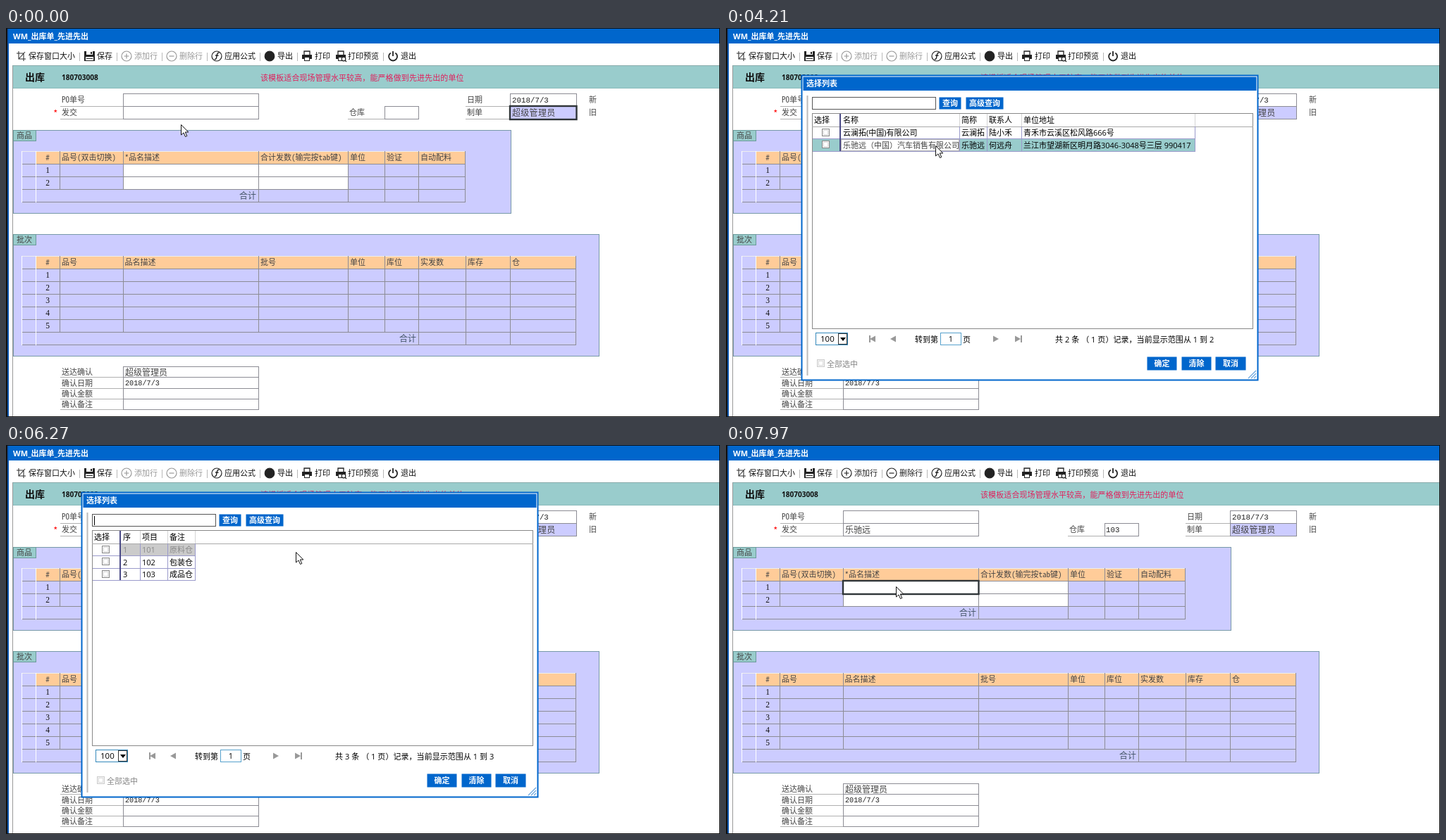
An HTML page for the animation above (8000 ms loop, 1013 by 553 pixels).

```html
<!DOCTYPE html>
<html lang="zh-CN">
<head>
<meta charset="utf-8">
<title>出库单</title>
<style>
html, body { margin: 0; width: 100%; height: 100%; overflow: hidden; background: #fff; }
svg { display: block; width: 1013px; height: 553px; }
text { font: 11px "Open Sans", "Noto Sans CJK SC", "Noto Sans CJK", sans-serif; white-space: pre; }
text.form { font-family: "Noto Sans Mono CJK SC", "Noto Sans CJK SC", "Noto Sans CJK", monospace; }
text.num { font-family: "Liberation Mono", monospace; }
text.serif { font-family: "Liberation Serif", serif; }
text.bold { font-weight: 700; }
.timed { animation: 8s step-end infinite; }
</style>
</head>
<body>
<svg id="stage" viewBox="0 0 1013 553" xmlns="http://www.w3.org/2000/svg"></svg>
<script>
const LOOP = 8000;
const BLUE = '#0066cc', TEAL = '#99cccc', LILAC = '#ccccff', PEACH = '#ffcc99';
const INK = '#444', LINE = '#8c8c94', MUTED = '#8a8a8a';
const css = [];

// Drawing helpers; text is placed by its left edge and vertical middle.
const text = (x, mid, s, { cls = '', size = 11, fill = '#000', anchor = 'start', gap = 0 } = {}) =>
  `<text class="${cls}" x="${x}" y="${(mid + size * 0.38).toFixed(1)}" fill="${fill}" text-anchor="${anchor}"` +
  ` style="font-size:${size}px;letter-spacing:${gap}px">${s}</text>`;
const form = (x, mid, s, o = {}) => text(x, mid, s, { cls: 'form', fill: INK, ...o });
const num = (x, mid, s, o = {}) => text(x, mid, s, { cls: 'num', size: 10.8, fill: '#222', ...o });
const bold = (x, mid, s, o = {}) => text(x, mid, s, { cls: 'bold', fill: '#fff', ...o });
const fill = (x1, y1, x2, y2, color) =>
  `<rect x="${x1}" y="${y1}" width="${x2 - x1}" height="${y2 - y1}" fill="${color}"/>`;
const box = (x1, y1, x2, y2, stroke = LINE, color = 'none', w = 1) =>
  `<rect x="${x1 + 0.5}" y="${y1 + 0.5}" width="${x2 - x1}" height="${y2 - y1}" fill="${color}" stroke="${stroke}" stroke-width="${w}"/>`;
const hline = (x1, x2, y, c = LINE) => fill(x1, y, x2, y + 1, c);
const vline = (x, y1, y2, c = LINE) => fill(x, y1, x + 1, y2, c);
const path = (d, stroke = '#222', w = 1.2, color = 'none') =>
  `<path d="${d}" fill="${color}" stroke="${stroke}" stroke-width="${w}"/>`;
const circle = (x, y, r, stroke, color = 'none') =>
  `<circle cx="${x}" cy="${y}" r="${r}" fill="${color}" stroke="${stroke}" stroke-width="1.2"/>`;
const pct = t => `${t / LOOP * 100}%`;

// Shows content only between two times of the loop.
function during(from, to, content) {
  const name = `on${from}_${to}`;
  css.push(`@keyframes ${name}{0%{visibility:hidden}${pct(from)}{visibility:visible}${pct(to)}{visibility:${to < LOOP ? 'hidden' : 'visible'}}}`);
  return `<g class="timed" style="animation-name:${name}">${content}</g>`;
}

function windowFrame() {
  return fill(0, 0, 1013, 553, '#fff') + fill(0, 0, 2, 553, '#111') + fill(2, 1, 4, 552, '#0b55b0') +
    fill(4, 1, 1012, 22, BLUE) + hline(0, 1013, 0, '#111') + hline(0, 1013, 552, '#111') +
    vline(1012, 0, 553, '#111') + bold(10, 11.5, 'WM_出库单_先进先出');
}

function rowButton(x, label, plus, color) {
  return circle(x, 40, 7, color) + path(`M${x - 3.5} 40h7` + (plus ? `M${x} 36.5v7` : ''), color) +
    text(x + 11, 40, label, { fill: color });
}
const rowButtons = color => rowButton(171, '添加行', true, color) + rowButton(235, '删除行', false, color);

const printer = x => path(`M${x + 3} 38v-5h8v5`, '#222', 1.3) + fill(x, 38, x + 14, 44, '#222') +
  box(x + 3, 41, x + 10, 46, '#222', '#fff');

function toolbar() {
  return path('M18 33v11h10M15 36h10v11M18 44l9-10', '#333', 1.1) +
    fill(111, 33, 126, 47, '#222') + fill(114, 33, 123, 38, '#fff') + fill(120, 34, 122, 37, '#222') +
    fill(113, 41, 124, 46, '#fff') + hline(114, 123, 43, '#222') +
    circle(299, 40, 7, '#222') + path('M302.5 35.5q-2.5-.8-3 2l-1 5q-.5 2.6-2.8 1.9M297 39h4.5', '#222', 1.4) +
    circle(374, 40, 6.8, '#222', '#222') +
    printer(420) + printer(468) + circle(479, 44, 2.8, '#222', '#fff') + path('M481 46l2 2') +
    path('M545.8 35.5a6 6 0 1 0 6.6 0M549 33v7', '#222', 1.8) +
    [[32, '保存窗口大小'], [129, '保存'], [310, '应用公式'], [385, '导出'], [438, '打印'], [485, '打印预览'], [560, '退出']]
      .map(([x, s]) => text(x, 40, s, { fill: '#111' })).join('') +
    [104, 157, 221, 285, 360, 413, 535].map(x => vline(x, 35, 47, '#b8b8b8')).join('') +
    during(0, 7970, rowButtons('#999')) + during(7970, LOOP, rowButtons('#222'));
}

function header() {
  return vline(9, 53, 552, '#999') + fill(10, 54, 1012, 86, TEAL) + hline(9, 1012, 53, '#8aa') + hline(10, 1012, 85, '#8bb') +
    bold(27, 70, '出库', { size: 14, fill: '#111' }) + bold(79, 70, '180703008', { size: 10.1, fill: '#111' }) +
    form(361, 70.5, '该模板适合现场管理水平较高，能严格做到先进先出的单位', { fill: '#e0205c', gap: 0.1 });
}

function fields() {
  const underline = (x1, x2, y) => hline(x1, x2, y, '#b0b0b0');
  return form(79, 102, 'PO单号') + form(79, 120, '发交') + form(67, 121, '*', { fill: '#f00', size: 13 }) +
    underline(77, 166, 111) + underline(77, 166, 129) + box(166, 93, 358, 111) + box(166, 111, 358, 129) +
    form(487, 120, '仓库') + underline(485, 537, 129) + box(537, 111, 585, 129) +
    form(654, 102, '日期') + form(654, 120, '制单') + underline(652, 715, 111) + underline(652, 715, 129) +
    box(715, 93, 809, 111) + box(715, 111, 809, 129, LINE, LILAC) +
    num(718, 102, '2018/7/3') + form(718, 120, '超级管理员', { size: 12, gap: 0.3 }) +
    form(827, 102, '新') + form(827, 120, '旧');
}

function panel(x2, y1, y2, label) {
  return box(10, y1, x2, y2, '#7799a8', LILAC) + box(10, y1, 42, y1 + 15, '#6b9a9a', TEAL) + form(15, y1 + 7.5, label);
}

function grid(xs, top, count, heads, totalCol, blank) {
  const rows = count + 2, right = xs[xs.length - 1], bottom = top + rows * 18;
  const lastRow = bottom - 18;
  let s = fill(42, top, right, top + 18, PEACH);
  if (blank) s += fill(...blank, '#fff');
  for (let r = 0; r <= rows; r++) s += hline(22, right + 1, top + r * 18, r ? LINE : '#eee');
  xs.forEach((x, i) => {
    const inTotal = i > 1 && i < totalCol;
    s += vline(x, top, inTotal ? lastRow : bottom + 1, i > 1 ? LINE : '#fff');
  });
  s += form(59, top + 9, '#', { anchor: 'middle' });
  heads.forEach((h, i) => s += form(xs[i + 2] + (i === 0 || i > 1 ? 3 : 2.5), top + 9, h));
  for (let r = 1; r <= count; r++)
    s += text(59, top + 9 + r * 18, r, { cls: 'serif', size: 11.5, anchor: 'middle', fill: '#111' });
  return s + form(xs[totalCol] - 3, lastRow + 9, '合计', { anchor: 'end', fill: '#456', size: 12 });
}

function goods() {
  return panel(716, 145, 263, '商品') + grid([22, 42, 76, 166, 358, 485, 537, 585, 651], 175, 2,
    ['品号(双击切换)', '*品名描述', '合计发数(输完按tab键)', '单位', '验证', '自动配料'], 4, [166, 193, 485, 229]);
}

function batches() {
  return panel(841, 293, 466, '批次') + grid([22, 42, 76, 166, 358, 485, 537, 585, 652, 715, 808], 324, 5,
    ['品号', '品名描述', '批号', '单位', '库位', '实发数', '库存', '仓'], 7);
}

function confirmation() {
  const ys = [481, 496, 512, 527, 542];
  return ['送达确认', '确认日期', '确认金额', '确认备注'].map((s, i) =>
    form(79, (ys[i] + ys[i + 1]) / 2 + 0.5, s) + hline(77, 166, ys[i + 1], '#b0b0b0') + box(166, ys[i], 358, ys[i + 1])).join('') +
    form(169, 489, '超级管理员', { size: 12 }) + num(169, 504, '2018/7/3', { size: 10.2 });
}

const focus = (x, y, x2) => box(x - 0.5, y - 0.5, x2, y + 18.5, '#2f3538', 'none', 2.4);

const button = (x1, y1, x2, y2, label) => fill(x1 + 0.5, y1 + 0.5, x2 - 0.5, y2 - 0.5, BLUE) +
  bold((x1 + x2) / 2, (y1 + y2) / 2, label, { anchor: 'middle' });
const checkbox = (x, y, c = '#888') => box(x, y, x + 10, y + 10, c, '#f4f4f4') + box(x + 2, y + 2, x + 8, y + 8, '#ddd', '#fff');

function dialog(total) {
  const arrow = (x, dir) => path(`M${x - 4 * dir} 437.5v9l${8 * dir}-4.5z`, 'none', 0, '#999');
  return fill(106.5, 66.5, 755.5, 501.5, BLUE) + fill(108.5, 68.5, 753.5, 499.5, '#fff') + fill(109.5, 69.5, 752.5, 89, BLUE) +
    bold(114, 78.5, '选择列表') + path('M115.5 96V494', '#bbb', 2) +
    box(122, 98, 297, 115, '#555', '#fff') + button(302, 98, 334, 116, '查询') + button(340, 98, 394, 116, '高级查询') +
    box(122, 121, 747, 427, '#888', '#fff') + hline(122, 748, 140, '#aaa') +
    box(127, 433, 172, 450, '#3388bb', '#fff') + text(134, 442, '100', { size: 11.5 }) +
    box(159, 434, 171, 449, '#333', '#fff') + path('M162 440h8l-4 5z', 'none', 0, '#000') +
    fill(203, 437, 205, 447, '#999') + arrow(208, -1) + arrow(237, -1) + arrow(383, 1) + arrow(414, 1) + fill(418, 437, 420, 447, '#999') +
    text(268, 443, '转到第') + box(304, 433, 333, 450, '#55a0cc', '#fff') + text(319, 442, '1', { anchor: 'middle' }) + text(336, 443, '页') +
    text(467, 443, `共 ${total} 条 （ 1 页）记录，当前显示范围从 1 到 ${total}`, { gap: 0.05 }) +
    checkbox(129, 471, '#ccc') + text(143, 477.5, '全部选中', { fill: '#888' }) +
    button(597, 467, 640, 487, '确定') + button(646, 467, 689, 487, '清除') + button(694, 467, 738, 487, '取消') +
    path('M741 498l11-11M745 498l7-7M749 498l3-3', '#6aa5dd', 1.2);
}

// One list inside a dialog; "dim" is the greyed row, "picked" the chosen one.
function list(xs, heads, rows, { dim = -1, picked = -1 } = {}) {
  const right = xs[xs.length - 1], top = r => 140 + Math.round(r * 17.3);
  let s = text(125, 131, '选择');
  heads.forEach((h, i) => s += text(xs[i] + (i ? 3 : 4), 131, h));
  rows.forEach((row, r) => {
    const y = top(r), end = top(r + 1), mid = (y + end) / 2 + 0.7;
    if (r === dim) s += fill(xs[0], y + 1, right, end, '#cbcbcb');
    if (r === picked) s += fill(123, y + 1, right, end, TEAL) + fill(xs[0] + 1, y + 1, xs[1], end, '#fff') +
      `<rect x="${xs[0] + 1.5}" y="${y + 1.5}" width="${xs[1] - xs[0] - 2}" height="${end - y - 2}" fill="none" stroke="#666" stroke-dasharray="1 1"/>`;
    s += checkbox(136, y + 3);
    row.forEach((cell, i) => s += text(xs[i] + (i ? 3 : 4), mid, cell,
      { fill: r === dim ? MUTED : r === picked && !i ? '#444' : '#000' }));
    s += hline(123, right + 1, end, '#9a9acb');
  });
  xs.forEach(x => s += vline(x, 122, 140, '#d4d4d4') + vline(x, 140, top(rows.length), '#9a9acb'));
  return s + fill(161, 122, 163, top(rows.length), '#4a4a86');
}

function customers(marks) {
  return list([162, 331, 370, 419, 665], ['名称', '简称', '联系人', '单位地址'], [
    ['云澜拓(中国)有限公司', '云澜拓', '陆小禾', '青禾市云溪区松风路666号'],
    ['乐驰远（中国）汽车销售有限公司', '乐驰远', '何远舟', '兰江市望湖新区明月路3046-3048号三层 990417']
  ], marks);
}

const stores = () => list([162, 190, 229, 268], ['序', '项目', '备注'],
  [['1', '101', '原料仓'], ['2', '102', '包装仓'], ['3', '103', '成品仓']], { dim: 0 });
const caret = vline(125, 101, 114, '#000');
const filterIcon = path('M321.5 125.5h7l-2.7 3v3h-1.6v-3z', '#889', 0.8, '#dde');

function pointer() {
  const stops = [[0, 248, 137], [100, 247, 135], [1300, 250, 127], [1700, 252, 125], [3780, 341, 170], [4210, 297, 167],
    [4610, 360, 160], [5030, 551, 123], [5450, 555, 119], [5870, 541, 123], [6270, 411, 152], [6720, 239, 182],
    [7150, 238, 182], [7570, 240, 194], [7970, 241, 201]];
  css.push('@keyframes pointer{' + stops.map(([t, x, y]) => `${pct(t)}{transform:translate(${x}px,${y}px)}`).join('') +
    '100%{transform:translate(241px,201px)}}');
  return '<g class="timed" style="animation-name:pointer">' +
    path('M.5.5V15L4 11.9 6.5 17.5 8.8 16.5 6.3 11H10.8Z', '#111', 1, '#fff') + '</g>';
}

document.getElementById('stage').innerHTML =
  windowFrame() + toolbar() + header() + fields() + goods() + batches() + confirmation() +
  during(4610, LOOP, form(169, 120, '乐驰远', { size: 12 })) +
  during(7150, LOOP, num(539, 120, '103')) +
  during(0, 2100, focus(715, 111, 809)) +
  during(2100, 5450, focus(166, 111, 358)) +
  during(5450, 7970, focus(537, 111, 585)) +
  during(7970, LOOP, focus(166, 193, 358)) +
  during(2960, 4610, dialog(2)) +
  during(2960, 4210, customers({ dim: 0 })) +
  during(4210, 4610, customers({ picked: 1 })) +
  during(2960, 3780, caret + filterIcon) +
  during(6270, 7150, dialog(3) + stores()) +
  during(6270, 6720, caret) +
  pointer();

const sheet = document.createElement('style');
sheet.textContent = css.join('\n');
document.head.append(sheet);
</script>
</body>
</html>
```
